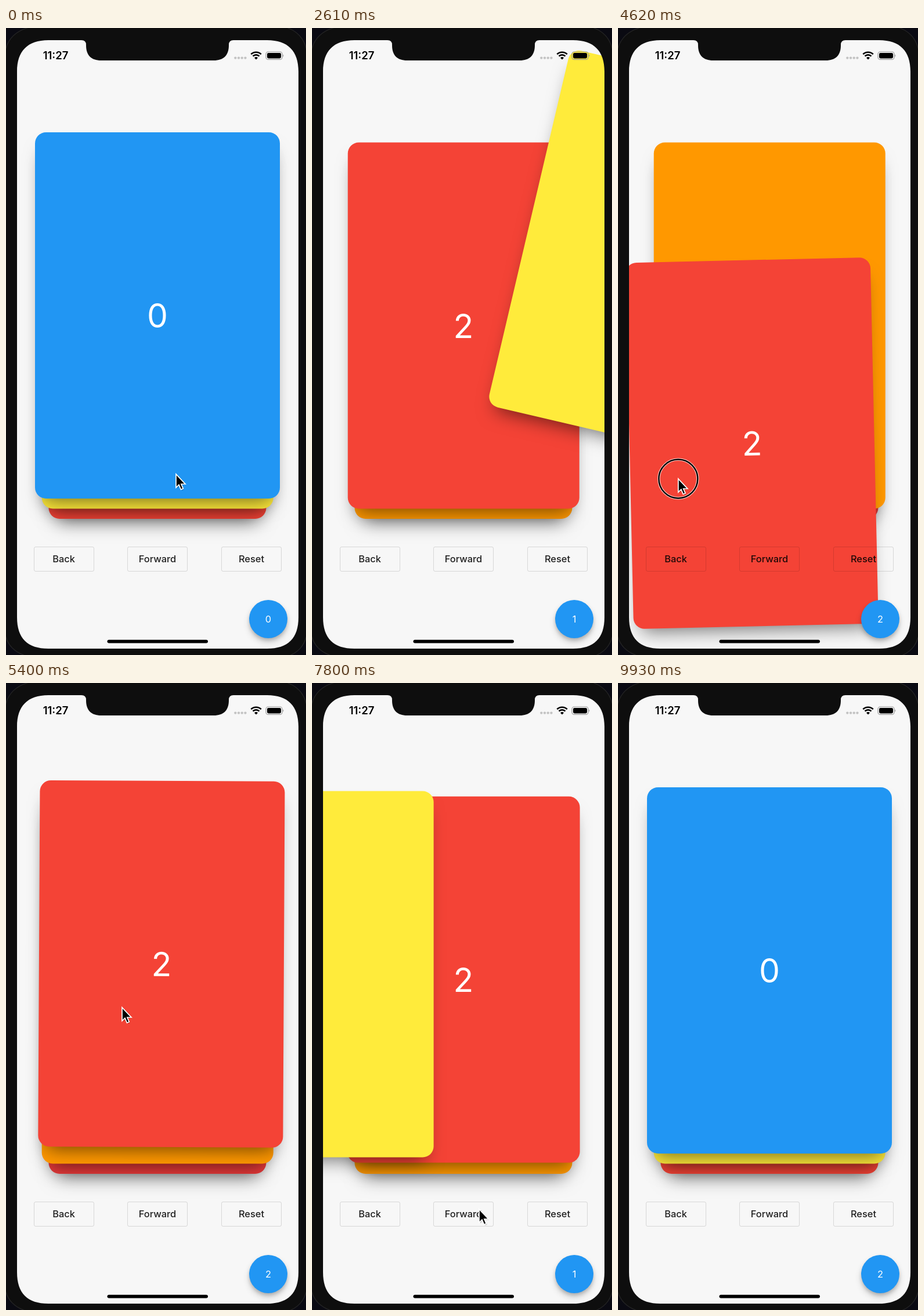
An HTML page that plays this animation: 517x1082 px, repeating every 9960 ms.

```html
<!DOCTYPE html>
<html lang="en">
<head>
<meta charset="utf-8">
<title>Card stack</title>
<style>
html, body { margin: 0; width: 100%; height: 100%; overflow: hidden; background: #f7f7f7; }
body { position: relative; font-family: Inter, Roboto, sans-serif; }
#stage { position: absolute; left: 0; top: 0; width: 517px; height: 1082px; overflow: hidden; background: #f7f7f7; }
.card {
  position: absolute; left: 0; top: 0; height: 632px; border-radius: 19px;
  display: flex; align-items: center; justify-content: center;
  color: #fff; font-size: 57px; line-height: 1; padding-top: 1px; box-sizing: border-box;
  box-shadow: 0 20px 32px -15px rgba(0, 0, 0, .54);
}
.button {
  position: absolute; top: 895px; width: 104px; height: 43px; box-sizing: border-box;
  border: 1.2px solid rgba(0, 0, 0, .13); border-radius: 3px;
  font-size: 16.4px; font-weight: 500; line-height: 41px; text-align: center; color: rgba(0, 0, 0, .87);
}
#count {
  position: absolute; left: 419px; top: 987px; width: 66px; height: 66px; border-radius: 50%;
  background: #2196f3; color: #fff; font-size: 16.4px; line-height: 66px; text-align: center;
  box-shadow: 0 4px 6px -1px rgba(0, 0, 0, .2), 0 7px 12px rgba(0, 0, 0, .16);
}
svg { position: absolute; left: 0; top: 0; overflow: visible; }
</style>
</head>
<body>
<div id="stage">
  <div id="deck"></div>
  <div class="button" style="left:47.5px">Back</div>
  <div class="button" style="left:209px">Forward</div>
  <div class="button" style="left:371px">Reset</div>
  <div id="count">0</div>

  <svg width="517" height="1082" viewBox="0 0 517 1082">
    <text x="85.5" y="54" text-anchor="middle" font-size="18.5" font-weight="600">11:27</text>
    <g fill="#c3c3c3">
      <circle cx="395.3" cy="51.6" r="2.2"/><circle cx="401" cy="51.6" r="2.2"/>
      <circle cx="406.7" cy="51.6" r="2.2"/><circle cx="412.4" cy="51.6" r="2.2"/>
    </g>
    <g fill="none" stroke="#000" stroke-width="2.7">
      <path d="M422.3 45.3a12.4 12.4 0 0 1 17.4 0M425.5 48.6a7.8 7.8 0 0 1 11 0"/>
      <path d="M431 54.5l-3-3.1a4.3 4.3 0 0 1 6 0z" fill="#000" stroke="none"/>
    </g>
    <rect x="448" y="41" width="28" height="13.4" rx="4" fill="none" stroke="#999" stroke-width="1.2"/>
    <rect x="450" y="43" width="24" height="9.4" rx="2.3"/>
    <path d="M477.4 45.5q2 2.2 0 4.4z" fill="#888"/>
    <rect x="174.500" y="1055.700" width="173.500" height="5.800" rx="2.900"/>

    <path fill="#0e0e0e" fill-rule="evenodd" d="M0 0H517V1082H0Z
      M73 21H130Q138 21 138 29V30C138 47 147 56 164 56H358C375 56 384 47 384 30V29Q384 21 392 21H450
      C486 21 504 40 504 75V1017C504 1053 486 1071 450 1071H73C37 1071 19 1053 19 1017V75C19 40 37 21 73 21Z"/>
    <path fill="#0a0a12" stroke="#252525" stroke-width="1.2"
      d="M-2 45Q2 8 43 -2H-2ZM519 45Q515 8 480 -2H519ZM-2 1042Q2 1074 36 1084H-2ZM519 1042Q515 1074 486 1084H519Z"/>

    <g id="cursor">
      <g id="ring" fill="none">
        <circle r="33.500" stroke="#fff" stroke-opacity=".75" stroke-width="4.500"/>
        <circle r="33.500" stroke="#000" stroke-width="2.400"/>
      </g>
      <path d="M2 3V24.500L7 20L10.500 28L14 26.500L10.500 18.500H17Z" fill="#000" opacity=".2"/>
      <path d="M0 0V23L5 18.300L8.500 26.500L12.300 24.900L8.900 17H16Z" stroke="#fff" stroke-width="1.700"/>
    </g>
  </svg>
</div>

<script>
const LOOP = 9960, MOVE = 1000, UNIT = 23.45, STEP = 17.5;
const colors = ['#2196f3', '#ffeb3b', '#f44336', '#ff9800', '#e83a3a'];

// Pointer tip: time, x, y
const path = [
  [0, 293, 770], [60, 293, 770], [600, 150, 735], [1080, -40, 692], [1400, -40, 692],
  [2080, 262, 720], [2140, 262, 720], [2570, 572, 649], [2900, 572, 649],
  [3500, 134, 631], [3650, 134, 631], [3950, 240, 560], [4250, 225, 690], [4620, 104, 778],
  [4900, 70, 690], [5200, 200, 560], [5500, 200, 560], [5950, 98, 905], [7130, 98, 905],
  [7420, 288, 908], [8180, 288, 908], [8610, 425, 905], [8910, 425, 905],
  [9300, 405, 965], [9800, 380, 1120]
];
const drags = [[80, 1080], [2110, 2570], [3650, 5200]];
const taps = [[6040, 6125], [7440, 7525], [8820, 8910]];
const moves = [
  { at: 1080, side: -1 }, { at: 2570, side: 1 },
  { at: 6125, back: true }, { at: 7525, side: -1 }
];
// From this time: top card, counter
const states = [[0, 0, 0], [2080, 1, 1], [3570, 2, 2], [7125, 1, 1], [8525, 2, 2], [8910, 0, 2]];

const byId = id => document.getElementById(id);
const clamp = v => Math.min(1, Math.max(0, v));
const within = list => t => list.some(([a, b]) => t >= a && t < b);
const pressed = within([...drags, ...taps]);

const cards = colors.map((color, i) => {
  const el = document.createElement('div');
  el.className = 'card';
  el.style.background = color;
  el.style.zIndex = colors.length - i;
  el.textContent = i;
  byId('deck').append(el);
  return el;
});
byId('deck').style.cssText = 'position:absolute;left:0;top:0;z-index:0';

function easeIn(x) {
  let lo = 0, hi = 1, s = x;
  for (let i = 0; i < 20; i++) {
    s = (lo + hi) / 2;
    const px = 1.26 * (1 - s) ** 2 * s + 3 * (1 - s) * s * s + s ** 3;
    if (px < x) lo = s; else hi = s;
  }
  return 3 * (1 - s) * s * s + s ** 3;
}
const part = (p, from, to) => {
  const x = clamp((p - from) / (to - from));
  return x === 0 || x === 1 ? x : easeIn(x);
};

// Smooth curve through the path that never overshoots a key
function slope(i, axis) {
  if (i < 1 || i > path.length - 2) return 0;
  const d = k => (path[k + 1][axis] - path[k][axis]) / (path[k + 1][0] - path[k][0]);
  const a = d(i - 1), b = d(i);
  return a * b <= 0 ? 0 : 2 * a * b / (a + b);
}
function pointer(t) {
  const last = path.length - 1;
  if (t >= path[last][0]) return path[last].slice(1);
  const i = path.findIndex((k, n) => n < last && t < path[n + 1][0]);
  const [a, b] = [path[i], path[i + 1]];
  const h = b[0] - a[0], u = (t - a[0]) / h, v = 1 - u;
  return [1, 2].map(n =>
    (1 + 2 * u) * v * v * a[n] + u * v * v * h * slope(i, n) +
    u * u * (3 - 2 * u) * b[n] - u * u * v * h * slope(i + 1, n));
}

function dragOffset(t) {
  const d = drags.filter(([a]) => t >= a).pop();
  if (!d) return [0, 0];
  const start = pointer(d[0]), now = pointer(Math.min(t, d[1]));
  const left = (1 - clamp((t - d[1]) / 380)) ** 3;
  return [(now[0] - start[0]) * left, (now[1] - start[1]) * 1.5 * left];
}

function place(i, slot, dx = 0, dy = 0, turn = 0) {
  if (!cards[i]) return;
  const w = 422 - UNIT * slot, s = cards[i].style;
  s.display = 'flex';
  s.width = w + 'px';
  s.transform = `translate(${261 + dx - w / 2}px, ${180 + STEP * slot + dy}px) rotate(${turn}deg)`;
}

function draw(t) {
  const [, top, count] = states.filter(s => t >= s[0]).pop();
  const move = moves.find(m => t >= m.at && t < m.at + MOVE);
  cards.forEach(c => c.style.display = 'none');

  if (move) {
    const p = (t - move.at) / MOVE;
    const a = part(p, 0, .5), b = part(p, .2, .5), c = part(p, .4, .7);
    if (move.back) {
      place(top - 1, 0, -30 * UNIT * (1 - a), STEP * (1 - a));
      place(top, b);
      place(top + 1, 1 + c);
    } else {
      const dragged = drags.some(d => d[1] === move.at);
      const [dx, dy] = dragged ? dragOffset(move.at) : [0, 0];
      place(top, 0, dx + move.side * 30 * UNIT * a, dy + (STEP - dy) * a, dx / UNIT);
      place(top + 1, 1 - b);
      place(top + 2, 2 - c);
    }
  } else {
    const [dx, dy] = dragOffset(t);
    place(top, 0, dx, dy, dx / UNIT);
    place(top + 1, 1);
    place(top + 2, 2);
  }

  byId('count').textContent = count;
  const [x, y] = pointer(t);
  byId('cursor').setAttribute('transform', `translate(${x} ${y})`);
  byId('ring').style.display = pressed(t) ? '' : 'none';
}

const begin = performance.now();
function tick() {
  draw((performance.now() - begin) % LOOP);
  requestAnimationFrame(tick);
}
draw(0);
requestAnimationFrame(tick);
</script>
</body>
</html>
```
